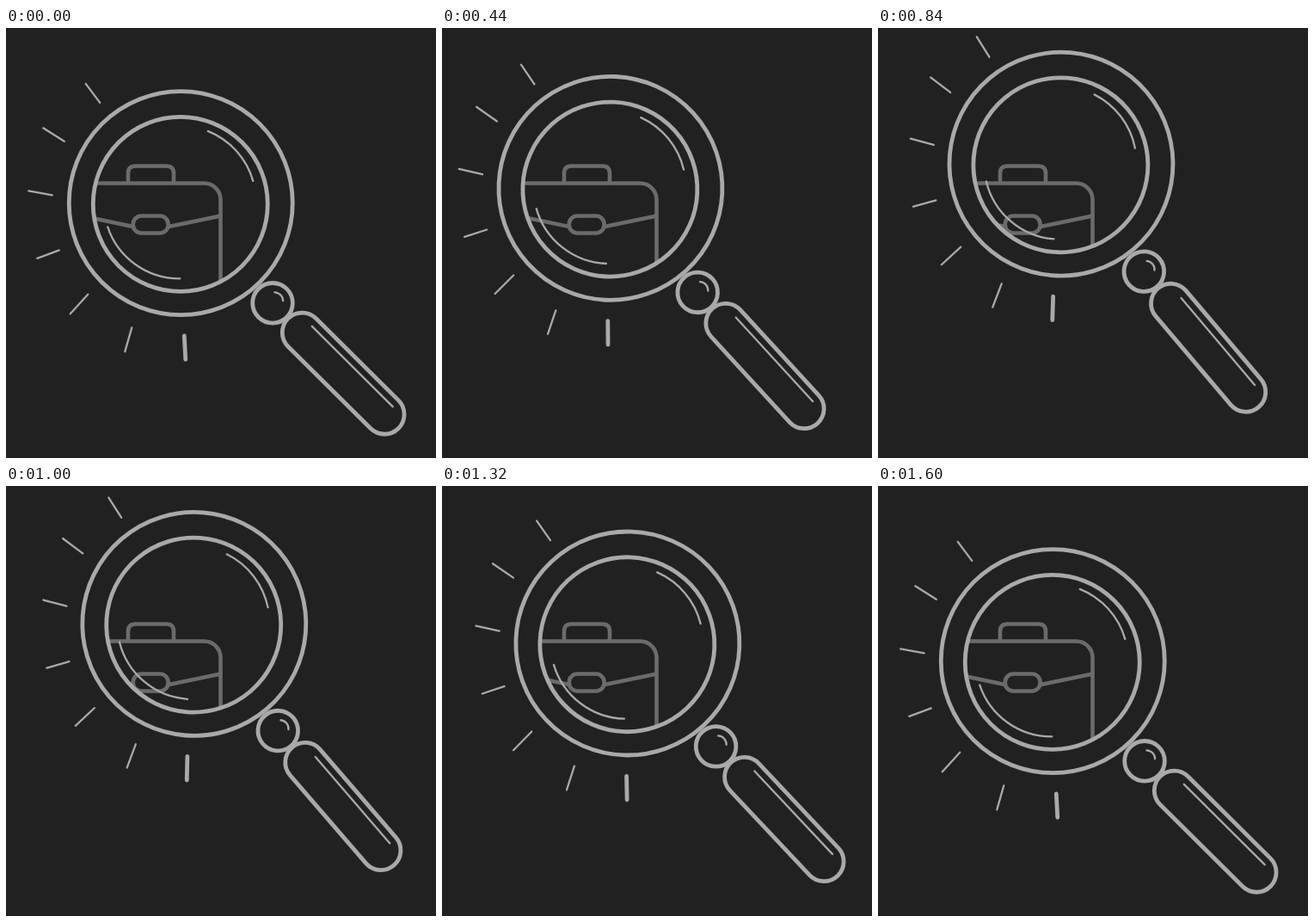
Write an HTML page that moves like this. It is 500 px wide and 500 px high and loops after 1.64 s.

```html
<!DOCTYPE html>
<html lang="en">
<head>
<meta charset="utf-8">
<title>Job search</title>
<style>
  html, body { margin: 0; width: 100%; height: 100%; overflow: hidden; background: #212121; }
  svg { display: block; width: 100%; height: 100%; }
  g { fill: none; stroke-linecap: round; stroke-linejoin: round; }
  .bag { stroke: #6b6b6b; stroke-width: 4.6; }
  .glass { stroke: #a9a9a9; stroke-width: 4.8; }
  .thin { stroke-width: 2.3; }
</style>
</head>
<body>
<svg viewBox="0 0 500 500">
  <defs>
    <clipPath id="view"><circle class="move" cx="203" cy="205" r="101.5"/></clipPath>
  </defs>
  <rect width="500" height="500" fill="#212121"/>
  <g class="bag" clip-path="url(#view)">
    <path d="M142 180V169Q142 160.500 150.500 160.500H186.500Q195 160.500 195 169V180"/>
    <path d="M60 180.500H230.500A19 19 0 0 1 249.500 199.500V330"/>
    <path d="M88 218.500L148 231M189 231L249.500 218.500"/>
    <rect x="147.800" y="218.500" width="40.800" height="20" rx="9.500"/>
  </g>
  <g class="glass move">
    <circle cx="203.500" cy="203.750" r="130"/>
    <circle cx="203" cy="205" r="101.500"/>
    <circle cx="310.250" cy="320" r="23.300"/>
    <rect x="-23" y="-23" width="181" height="46" rx="23" transform="translate(344.500 354.300) rotate(44.800)"/>
    <path d="M207.500 358L209 385.500"/>
    <g class="thin">
      <path d="M235 120A89 89 0 0 1 287.500 178M118.500 231.500A88 88 0 0 0 202.500 291.500"/>
      <path d="M312.500 307.500A10 10 0 0 1 322.300 317.500M356 347L450 440.500"/>
      <path d="M93 65L109.500 87M43.500 116.500L68 132M26.500 189.500L54 194.500M36.500 268L62 258.500M75 332.500L95.500 310M138.500 376.500L146.500 348.500"/>
    </g>
  </g>
</svg>
<script>
  const { sin, cos, PI } = Math;
  const LOOP = 1640, STEP = 40, ORBIT = 1600;
  const parts = document.querySelectorAll('.move');

  // The glass drifts on an oval path and tilts about the lens centre.
  function draw(ms) {
    const t = Math.floor((ms % LOOP) / STEP) * STEP;
    const a = 2 * PI * t / ORBIT;
    const b = a - PI / 20;
    const x = 207.1 - 3.83 * cos(a) - 12.09 * sin(a) + 0.25 * sin(2 * a) - 0.3 * sin(3 * a);
    const y = 181.3 + 21.88 * cos(a) + 8.51 * sin(a) + 0.3 * sin(2 * a) + 0.4 * cos(3 * a);
    const tilt = 2.55 - 2.4 * cos(b) - 0.1 * cos(2 * b) - 0.1 * cos(3 * b);
    const move = `translate(${x} ${y}) rotate(${tilt}) translate(-203.5 -203.75)`;
    parts.forEach(p => p.setAttribute('transform', move));
  }

  const start = performance.now();
  function tick() {
    draw(performance.now() - start);
    requestAnimationFrame(tick);
  }
  draw(0);
  requestAnimationFrame(tick);
</script>
</body>
</html>
```
